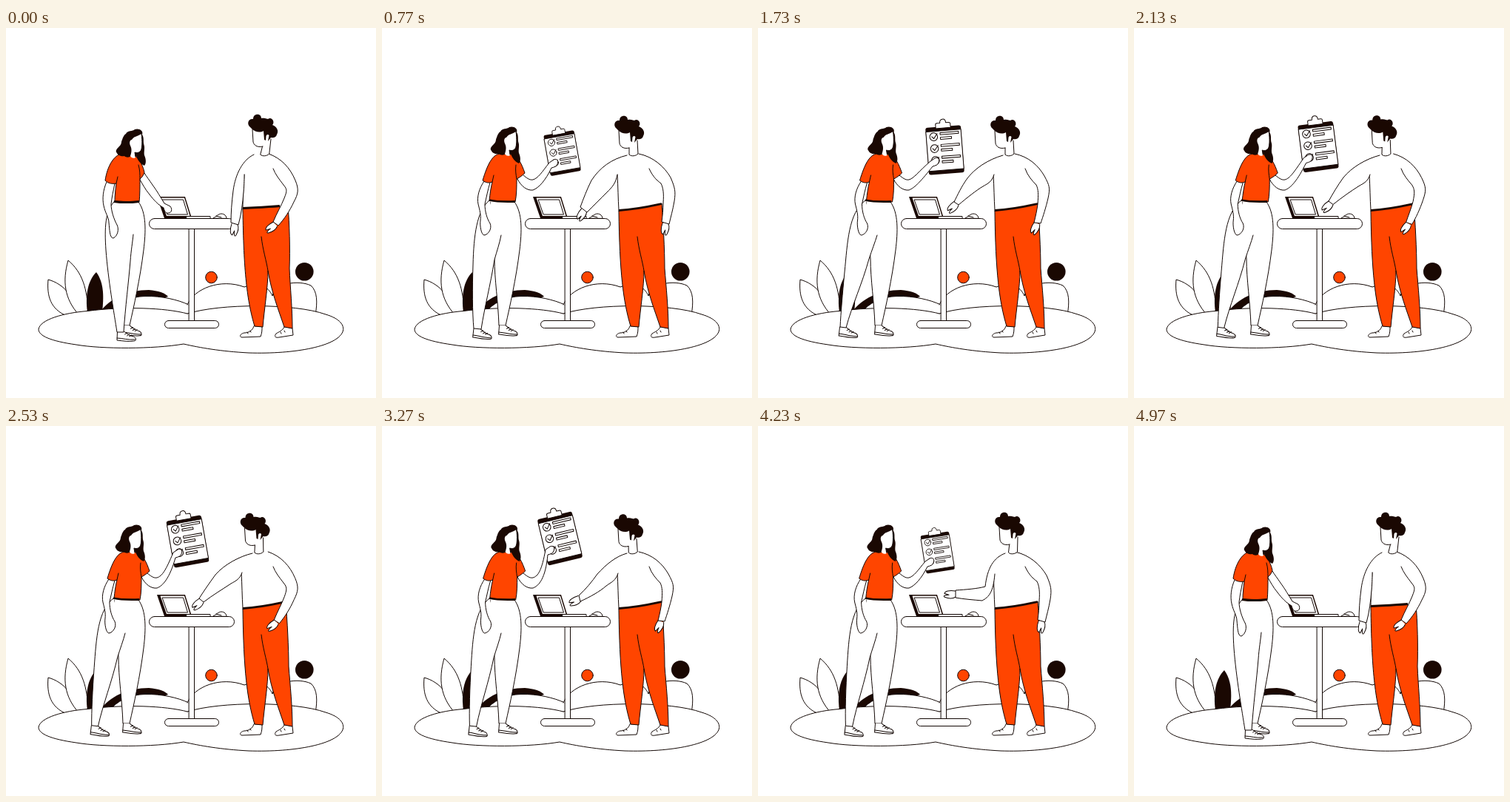
An HTML page for the animation above (5 s loop, 500 by 500 pixels).

```html
<!DOCTYPE html>
<html lang="en">
<head>
<meta charset="utf-8">
<title>Checklist meeting</title>
<style>
  html, body { margin: 0; width: 100%; height: 100%; overflow: hidden; background: #fff; }
  svg { display: block; width: 100vw; height: 100vh; }
  .line { fill: #fff; stroke: #120704; stroke-width: 1; stroke-linejoin: round; stroke-linecap: round; }
  .bare { fill: none; }
  .dark { fill: #1a0802; }
  .red { fill: #ff4500; }
  .plain { fill: #fff; }
  .belt { fill: none; stroke: #1a0802; stroke-width: 2.8; }
</style>
</head>
<body>
<svg viewBox="0 0 500 500">
  <defs>
    <g id="shoe">
      <path class="line" d="M0 0L-.5 12C8 13 16 14 22 13C26 13 26 9 22 7C16 6 13 3 9 0"/>
      <path class="line bare" d="M-.5 9C7 9 14 12 24 11M10 4l3 -2M13 6l3 -2M16 7l3 -2"/>
    </g>
    <path id="hand" class="line" d="M0 -4C4 -6 10 -5.5 15 -3C18 -1 13 0 9 -.5L15 2C14 5 8 6 0 4"/>
    <g id="item">
      <circle class="line" r="5.3"/>
      <path class="line bare" d="M-2.5 -.5L0 2.5L5 -4"/>
      <rect class="line" x="9" y="-5" width="25" height="2.8"/>
      <rect class="line" x="9" y="1.2" width="15" height="2.8"/>
    </g>
  </defs>

  <g id="garden">
    <path class="line" d="M82 389C60 380 55 362 57 340C79 346 92 364 98 387Z"/>
    <path class="line" d="M98 387C79 366 76 342 84 314C103 330 110 352 111 385Z"/>
    <path class="dark" d="M110 385C107 362 110 342 122 330C133 345 132 365 130 384Z"/>
    <path class="dark" d="M126 385C140 365 165 354 193 354C206 355 215 358 219 363L190 372L145 385Z"/>
    <path class="line" d="M140 384C150 372 166 363 188 362.5C210 362 232 367 247 374"/>
    <path class="line" d="M245 374C254 352 290 338 322 350C342 342 355 350 360 362C363 345 395 340 412 348C421 356 421 371 418 388"/>
    <path class="line" d="M245 386C290 372 390 372 432 387C452 393 457 402 455.5 409C450 430 390 441 328 439C290 437 262 432 240 427C200 434 130 434 95 428C60 423 44 416 44 407C46 394 78 385 110 382.5C160 376 215 378 245 386"/>
    <circle class="line red" cx="277.5" cy="337" r="7.8"/>
    <circle class="dark" cx="403.3" cy="329.3" r="12.3"/>
  </g>

  <g id="table">
    <rect class="line" x="247.5" y="270" width="7" height="127"/>
    <rect class="line" x="214.5" y="395.5" width="73" height="10" rx="5"/>
    <rect class="line" x="193.5" y="257.5" width="115" height="14" rx="7"/>
    <path class="dark" d="M204 228L242 228L251 257L214 257Z"/>
    <path class="plain" d="M208.5 229.5L241 229.5L248.5 254L217 254Z"/>
    <path class="line" d="M211.5 232L239.5 232L245.5 252L218.5 252Z"/>
    <rect class="line" x="244" y="254.5" width="32" height="3"/>
    <path class="line" d="M280 257C284 255 287 251 291 251C295 251 298 254 298 257ZM284 254L291 256"/>
  </g>

  <g id="woman">
    <path class="line" d="M179 235C190 250 189 275 186 300C181 340 173 375 167 402L158 402C157 370 152 340 152 312L146 235"/>
    <use href="#shoe" transform="translate(158.5 402) rotate(2)"/>
    <use href="#shoe" id="backShoe"/>
    <path class="line" id="backLeg"/>
    <g id="clipboard">
      <rect class="dark" x="-24" y="-32" width="48" height="64" rx="3"/>
      <rect class="line" x="-23.7" y="-26.5" width="47.4" height="53.5"/>
      <path class="line" d="M-10 -30V-35Q-10 -37 -8 -37H-4Q-4 -42 0 -42Q4 -42 4 -37H8Q10 -37 10 -35V-30Z"/>
      <use href="#item" transform="translate(-13.7 -19)"/>
      <use href="#item" transform="translate(-13.7 -3)"/>
      <use href="#item" transform="translate(-13.7 13)"/>
    </g>
    <path class="line" id="reach"/>
    <g id="bust">
      <path class="line" id="hang"/>
      <path class="line red" id="blouse"/>
      <path class="line bare" id="folds"/>
      <g id="womanHead">
        <path class="dark" d="M160 140C162 135 169 137 172 134C178 132 184 136 182 141C185 146 183 150 184.500 155C186 160 184 164 185 169C188 176 187 181 185 183C180 181 176 176 174 170L167 169C165 173 160 172 158 170C154 171 149 169 148 166C145 163 148 160 151 157C155 153 153 152 155 148C156 144 158 141 160 140Z"/>
        <path class="plain" d="M181 140C182.500 150 182 160 180 163C177 166 175 166 172 165L173 172C170 174 167 172 166 170C168 164 168 160 166 156C164 151 166 148 168 148C171 143 175 144 181 140Z"/>
        <path class="line bare" d="M181 140C182.500 150 182 160 180 163C177 166 175 166 172 165L173 171"/>
      </g>
    </g>
    <path class="belt" id="womanBelt"/>
  </g>

  <g id="man">
    <path class="line" d="M335 403C333 409 328 412 322 412C316 413 315 418 319 418L344 417C346 412 346 408 346 404ZM327 413l-1 -2M331 411l-1 -2"/>
    <path class="line" d="M376 404C374 409 368 411 365 413C362 417 364 419 369 418L388 415L387 406ZM372 413l-1 -2M377 411l-1 -2"/>
    <path class="line red" id="pants"/>
    <path class="line bare" d="M345 282C347 300 352 315 354 328"/>
    <path class="plain" id="torso"/>
    <path class="line bare" id="side"/>
    <path class="belt" id="manBelt"/>
    <use href="#hand" id="restHand"/>
    <path class="line" id="restArm"/>
    <use href="#hand" id="pointHand"/>
    <path class="line" id="pointArm"/>
    <path class="line" id="neck"/>
    <g id="manHead">
      <path class="plain" d="M320 139L321 156C322 160 326 164 334 162L343 155L343 138Z"/>
      <path class="line bare" d="M320 139L321 156C322 160 326 164 334 162"/>
      <path class="dark" d="M317 136C312 132 314 124 321 125C321 117 332 117 332 124C337 123 340 125 341 125C346 121 351 129 347 133C353 135 356 141 353 146C352 150 348 151 345 150L341 155L342.500 147C341 145 339 146 338.500 148L338 154L336 153L335 141C330 144 323 142 320 139Z"/>
    </g>
  </g>
</svg>
<script>
const LOOP = 5000;
const NUMBER = /-?\d+(\.\d+)?/g;
const el = id => document.getElementById(id);
const shape = (id, d) => el(id).setAttribute('d', d);
const place = (id, x, y, turn = 0, size = 1) =>
  el(id).setAttribute('transform', `translate(${x} ${y}) rotate(${turn}) scale(${size})`);

// Interpolates every number in two strings of the same structure.
function mix(a, b, k) {
  const ends = b.match(NUMBER);
  let i = 0;
  return a.replace(NUMBER, v => (+v + (ends[i++] - v) * k).toFixed(2));
}
function morph(shapes, p) {
  const i = Math.max(0, Math.min(Math.floor(p), shapes.length - 2));
  return mix(shapes[i], shapes[i + 1], p - i);
}
// Eased position along a list of key times: 2.5 is halfway from key 2 to key 3.
function along(times, t) {
  if (t <= times[0]) return 0;
  const i = times.findIndex(v => v > t);
  if (i < 0) return times.length - 1;
  const k = (t - times[i - 1]) / (times[i] - times[i - 1]);
  return i - 1 + k * k * (3 - 2 * k);
}
const values = (rows, p) => morph(rows, p).match(NUMBER).map(Number);

const manTimes = [30, 770, 1730, 2530, 3270, 4230, 4930];
const womanTimes = [30, 770, 1050, 1730, 2530, 3270, 4230, 4930];
const sizeTimes = [230, 930, 4050, 4700];

// step, lift, hand x, hand y, board angle
const womanPoses = [
  '0 0 229 196 -8', '1 1 231 183 -10', '1.4 1 230 175 -11', '2 1 238 181 -4.5',
  '1.64 1 231 172 -10', '1.43 1 226 168 -13.5', '1.43 1 231 184 -9', '0 0 229 196 -8'
];
const backLegs = [
  'M146 235C134 247 133 270 135 300C138 340 146 385 150 411L159 411C161 380 166 340 168 315C169 300 171 290 172 279',
  'M145 233C128 247 124 280 123 320C122 350 122 385 124 406L134 407C139 375 146 350 152 313C155 302 159 291 161 280',
  'M145 233C122 250 121 290 117 330C114 360 112 385 111 404L119 405C127 375 141 345 150 312C154 300 158 290 161 280'
];
const backShoes = ['150.5 410 0', '124 406 4', '110.5 404 4'];
const blouses = [
  'M156 170C146 172 137 186 134 206C138 210 143 211 149 210C148 218 147 226 147 234L180 235C181 226 181 214 181 204C184 202 186 198 187 195C184 182 178 174 172 171Z',
  'M160 170C149 170 142 186 136 206C140 209 144 210 149 208C147 216 146 224 145 233L180 235C182 226 182 214 182 204C186 202 190 199 193 196C189 184 184 174 177 171Z'
];
const hanging = [
  'M136 208C131 219 130 231 132 240C134 250 139 256 139 263C140 272 140 284 145 284C151 281 153 272 150 266C146 259 142 247 142 238C143 229 145 220 147 210',
  'M138 207C131 217 128 229 130 238C132 246 134 253 133 260C132 267 134 279 138 280C144 279 149 271 146 264C142 258 139 248 139 238C141 229 143 219 146 209'
];
const reachDown = 'M181 205C184 210 188 218 194 225C200 233 206 239 213 243C214 247 216 251 219 250C224 250 225 245 222 241L214 237C209 229 204 220 198 212C194 206 190 201 187 196';
const reachUp = (x, y) =>
  `M183 204C188 214 196 220 204 219C212 216 221 206 ${x - 2} ${y + 6}C${x + 2} ${y + 5} ${x + 5} ${y + 4} ${x + 6} ${y + 1}` +
  `C${x + 8} ${y - 4} ${x + 5} ${y - 7} ${x + 1} ${y - 5}L${x - 5} ${y - 1}C216 195 211 203 204 205C199 206 195 202 191 199`;

// head dx, head dy, resting arm, lean
const manPoses = ['13 -2 0 0', '0 0 2 1', '0 0 1 1', '2.5 -1 0.1 1', '-1 0.5 1 1', '6 -2 2 1', '13 -2 0 0'];
const pointArms = [
  'M335 171C320 178 310 197 307 220C305 235 304 250 304 263L314 266C318 252 320 235 321 222C322 210 322 203 322 198',
  'M331 172C310 177 294 189 283 206C277 218 272 231 268 242L277 249C286 240 296 230 304 222C311 215 316 210 318 198',
  'M331 172C310 178 293 190 283 203C275 214 270 225 265 235L271 239C283 229 294 220 304 214C311 210 316 208 319 198',
  'M333 172C316 176 295 187 283 201C275 212 268 222 261 233L267 238C280 228 292 221 304 213C311 209 316 207 319 198',
  'M331 172C316 176 303 187 291 200C284 210 275 221 266 229L268 237C281 231 294 224 303 216C310 211 316 209 319 199',
  'M334 172C318 178 310 192 307 217C296 220 281 221 267 222L267 232C278 234 292 235 303 236C312 231 318 225 320 200'
];
pointArms.push(pointArms[0]);
const pointHands = ['309 265 95', '273 246 118', '268 237 132', '264 236 135', '267 233 150', '267 227 175', '309 265 95'];
const restArms = [
  'M355 170C372 176 384 189 391 206C396 218 395 224 389 235C383 248 376 258 368 267L361 262C366 250 372 240 376 230C380 220 380 218 375 212C369 204 364 198 361 190',
  'M347 170C366 174 379 186 387 200C394 213 395 216 392 230C389 243 385 255 382 264L373 263C375 255 377 246 378 238C379 225 379 218 376 212C370 206 364 199 361 190',
  'M347 170C367 174 382 188 390 202C396 216 397 221 395 234C393 246 390 256 388 265L378 262C379 254 380 245 380 236C381 224 380 216 377 210C370 205 365 199 361 190'
];
const restHands = ['364 265 140', '377 264 112', '383 264 95'];
const pants = [
  'M320 244L381 241C383 262 384 300 383 325C384 350 387 380 387 406L376 404C368 380 359 358 354 328C354 350 349 380 347 404L336 403C326 370 321 330 320 244Z',
  'M320 247L378 237C380 262 382 300 382 325C384 350 387 380 387 406L376 404C368 380 359 358 354 328C354 350 349 380 347 404L336 403C326 370 321 330 320 247Z'
];
const torsos = [
  'M343 171L324 182L320 243L379 241L380 215L361 180Z',
  'M333 172L319 182L320 247L378 238L378 212L361 180Z'
];
const sides = ['M322 198C321 215 320 230 320 243', 'M318 198C319 215 319 230 320 246'];
const manBelts = ['M320 243.5C337 243 354 242 370 240.5', 'M320 246.5C345 245 362 241 378 237.5'];
const folds = [
  'M151 201L149 210M179 185C181 192 181 198 181 204',
  'M151 199L149 208M181 185C180 192 181 198 182 204'
];
const womanBelts = ['M146 234.5C156 236 168 236 180 234.5', 'M145 232.5C156 235 168 235 180 234.5'];

function drawWoman(t) {
  const [step, lift, x, y, angle] = values(womanPoses, along(womanTimes, t));
  const [size] = values(['0', '1', '1', '0'], along(sizeTimes, t));
  shape('backLeg', morph(backLegs, step));
  place('backShoe', ...values(backShoes, step));
  shape('blouse', morph(blouses, lift));
  shape('folds', morph(folds, lift));
  shape('hang', morph(hanging, lift));
  shape('womanBelt', morph(womanBelts, lift));
  place('womanHead', 2 * (1 - lift), 3 * (1 - lift));
  place('bust', Math.max(0, step - 1) * 1.5, 0);

  shape('reach', mix(reachDown, reachUp(x, y), lift));
  const handX = 219 + (x - 219) * lift, handY = 245 + (y - 245) * lift;
  place('clipboard', handX + 14.5 * size, handY - 16 * size, angle, size);
}

function drawMan(t) {
  const p = along(manTimes, t);
  const [dx, dy, rest, lean] = values(manPoses, p);
  shape('pants', morph(pants, lean));
  shape('torso', morph(torsos, lean));
  shape('side', morph(sides, lean));
  shape('manBelt', morph(manBelts, lean));
  shape('restArm', morph(restArms, rest));
  place('restHand', ...values(restHands, rest));
  shape('pointArm', morph(pointArms, p));
  place('pointHand', ...values(pointHands, p));
  const collar = 0.75 * dx;
  shape('neck', `M${334 + dx} ${160 + dy}L${334 + collar} 171C${337 + collar} 174 ${343 + collar} 173 ${346 + collar} 170L${345 + dx} ${152 + dy}`);
  place('manHead', dx, dy);
}

const start = performance.now();
(function tick() {
  const t = (performance.now() - start) % LOOP;
  drawWoman(t);
  drawMan(t);
  requestAnimationFrame(tick);
})();
</script>
</body>
</html>
```
